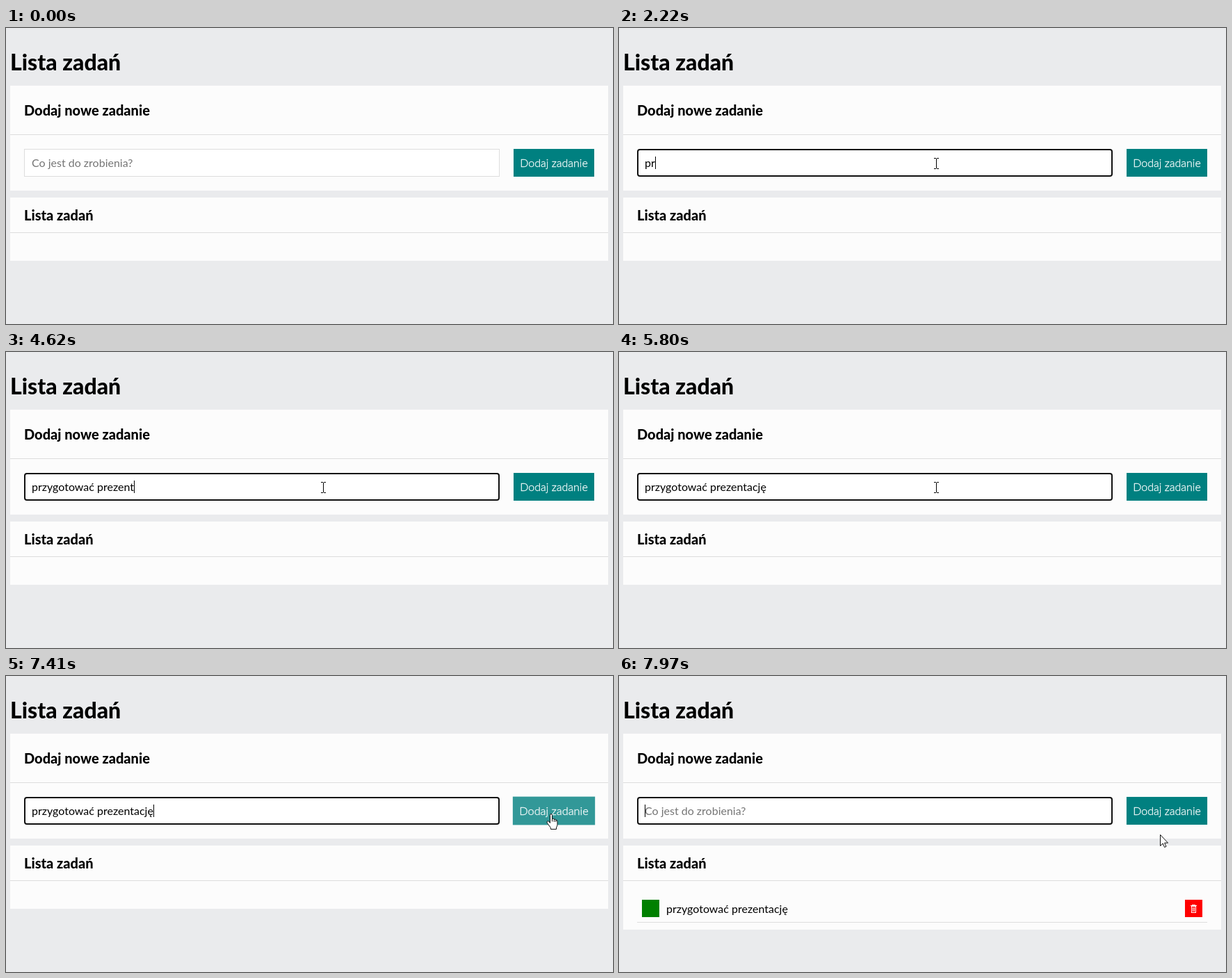
An HTML page with a canvas for the animation above (8 s loop, 873x426 px).

```html
<!DOCTYPE html>
<html lang="pl">
<head>
<meta charset="utf-8">
<title>Lista zadań</title>
<style>
  html, body { margin: 0; width: 100%; height: 100%; overflow: hidden; }
  body { position: relative; background: #eaebed; color: #000; font: 400 16px/24px Lato, sans-serif; }
  body *, canvas { position: absolute; box-sizing: border-box; margin: 0; white-space: pre; }
  h1 { left: 6px; top: 25px; font: 800 32px/48px Lato, sans-serif; }
  h2 { left: 20px; font: 800 20px/30px Lato, sans-serif; }
  section { left: 6px; width: 860px; background: #fcfcfc; }
  hr { left: 0; width: 860px; height: 1px; border: 0; background: #ddd; }
  #form { top: 83px; height: 151px; }
  #form h2 { top: 20px; }
  #form hr { top: 70px; }
  #list { top: 244px; height: 91px; }
  #list h2 { top: 10px; }
  #list hr { top: 50px; }
  #field { left: 20px; top: 91px; width: 684px; height: 40px; border: 1px solid #ddd; background: #fff; }
  #field.focus { border: 2px solid #101010; border-radius: 4px; }
  #hint, #typed { left: 31px; top: 91px; line-height: 40px; height: 40px; }
  #hint { color: #757575; }
  #typed.caret::after { content: ""; position: absolute; left: 100%; top: 11px; width: 1px; height: 18px; background: #000; }
  #add { left: 724px; top: 91px; width: 116px; height: 40px; background: teal; color: #fff;
         font-weight: 300; line-height: 40px; text-align: center; -webkit-text-stroke: 0.3px #fff; }
  #item { left: 20px; top: 71px; width: 820px; height: 40px; border-bottom: 1px solid #ddd; }
  #item i { top: 7px; width: 25px; height: 25px; }
  #done { left: 7px; background: green; }
  #remove { left: 788px; background: red; }
  #item span { left: 42px; top: 8px; }
  canvas { left: 0; top: 0; }
</style>
</head>
<body>
<h1>Lista zadań</h1>
<section id="form">
  <h2>Dodaj nowe zadanie</h2><hr>
  <div id="field"></div>
  <span id="hint">Co jest do zrobienia?</span>
  <span id="typed"></span>
  <div id="add">Dodaj zadanie</div>
</section>
<section id="list">
  <h2>Lista zadań</h2><hr>
  <div id="item"><i id="done"></i><span>przygotować prezentację</span><i id="remove"></i></div>
</section>
<canvas id="overlay" width="873" height="426"></canvas>
<script>
const $ = id => document.getElementById(id);
const ctx = $("overlay").getContext("2d");

const TASK = "przygotować prezentację";
const LOOP = 8000, BLINK = 530, STEP = 67;
const ENTER = 260, FOCUS = 1070, TYPE = 2080, TYPED = 5210, LEAVE_FIELD = 6070, PRESS = 7340, ADDED = 7480;

const ramp = (t, from, to) => Math.min(1, Math.max(0, (t - from) / (to - from)));
const smooth = u => u * u * (3 - 2 * u);
const easeOut = (u, power) => 1 - (1 - u) ** power;
const mix = (a, b, u) => a + (b - a) * u;

// The screen refreshes in steps while the pointer moves.
function stepped(t) {
  const start = t < LEAVE_FIELD ? ENTER : t < PRESS ? LEAVE_FIELD : PRESS;
  return start + Math.floor((t - start) / STEP) * STEP;
}

function pointerAt(t) {
  if (t < LEAVE_FIELD) {
    const u = ramp(t, ENTER, 860);
    return [mix(706, 456, easeOut(u, 3)), mix(418, 195, easeOut(u, 1.5))];
  }
  const across = smooth(ramp(t, LEAVE_FIELD, 6660));
  const down = smooth(ramp(t, 7540, 7940));
  return [mix(456, 783, across) - 5 * down, mix(195, 199, across) + 29 * down];
}

function typedCount(t) {
  if (t < TYPE || t >= ADDED) return 0;
  return 1 + Math.floor((TASK.length - 1) * easeOut(ramp(t, TYPE, TYPED), 1.15));
}

function caretLit(t) {
  if (t < FOCUS) return false;
  if (t >= PRESS) return true;
  const lastInput = t < TYPE ? FOCUS : Math.min(t, TYPED);
  return Math.floor((t - lastInput) / BLINK) % 2 === 0;
}

function outline(d) {
  const path = new Path2D(d);
  ctx.fillStyle = "#fff";
  ctx.strokeStyle = "#111";
  ctx.lineWidth = 1;
  ctx.lineJoin = "round";
  ctx.fill(path);
  ctx.stroke(path);
}

const pointers = {
  beam() {
    ctx.fillStyle = "#000";
    ctx.fillRect(0, -7, 1, 14);
    for (const y of [-8, 7]) {
      ctx.fillRect(-3, y, 3, 1);
      ctx.fillRect(1, y, 3, 1);
    }
  },
  arrow() {
    outline("M.5 .5V16.5L4.2 13L6.6 18.5L9 17.4L6.6 12.2H11.5Z");
  },
  hand() {
    ctx.translate(-6, -1);
    outline("M5.5 13.5V2.5Q5.5 .5 7 .5T8.5 2.5V7.5Q11 6.5 11.3 8.3Q13.5 7.5 13.8 9.3" +
      "Q16 9 16 11.5V15.5Q16 18 14.5 20V22.5H6.5V20.5L1.3 13.5Q.5 11.5 2 10.7Q3.5 10.3 5.5 13.5Z");
    ctx.stroke(new Path2D("M8.5 7.5V11.5M11.3 8.3V12M13.8 9.3V12"));
  }
};

const inside = (x, y, l, t, r, b) => x >= l && x < r && y >= t && y < b;

function drawPointer(t) {
  const [x, y] = pointerAt(stepped(t)).map(Math.round);
  const kind = inside(x, y, 26, 174, 710, 214) ? "beam"
    : inside(x, y, 730, 174, 846, 214) ? "hand" : "arrow";
  ctx.save();
  ctx.translate(x, y);
  pointers[kind]();
  ctx.restore();
}

function drawBin() {
  ctx.fillStyle = ctx.strokeStyle = "#fff";
  ctx.lineWidth = 1;
  ctx.fillRect(822, 330, 9, 1);
  ctx.fillRect(824, 329, 5, 1);
  ctx.strokeRect(823.5, 331.5, 6, 9);
  ctx.fillRect(825, 333, 1, 6);
  ctx.fillRect(827, 333, 1, 6);
}

function styleButton(t) {
  const hover = ramp(t, 6430, 6730) - ramp(t, 7740, 7960);
  const press = ramp(t, PRESS, 7400) - ramp(t, 7550, 7680);
  $("add").style.opacity = 1 - 0.1 * (hover + press);
  $("add").style.transform = hover ? `scale(${1 + 0.02 * hover})` : "none";
}

function render(t) {
  const added = t >= ADDED, count = typedCount(t);
  $("field").classList.toggle("focus", t >= FOCUS);
  $("typed").textContent = TASK.slice(0, count);
  $("typed").classList.toggle("caret", caretLit(t));
  $("hint").hidden = count > 0;
  $("item").hidden = !added;
  $("list").style.height = added ? "121px" : "91px";
  styleButton(stepped(t));

  ctx.clearRect(0, 0, 873, 426);
  if (added) drawBin();
  if (t >= ENTER) drawPointer(t);
}

const begin = performance.now();
function tick() {
  render((performance.now() - begin) % LOOP);
  requestAnimationFrame(tick);
}
tick();
</script>
</body>
</html>
```
